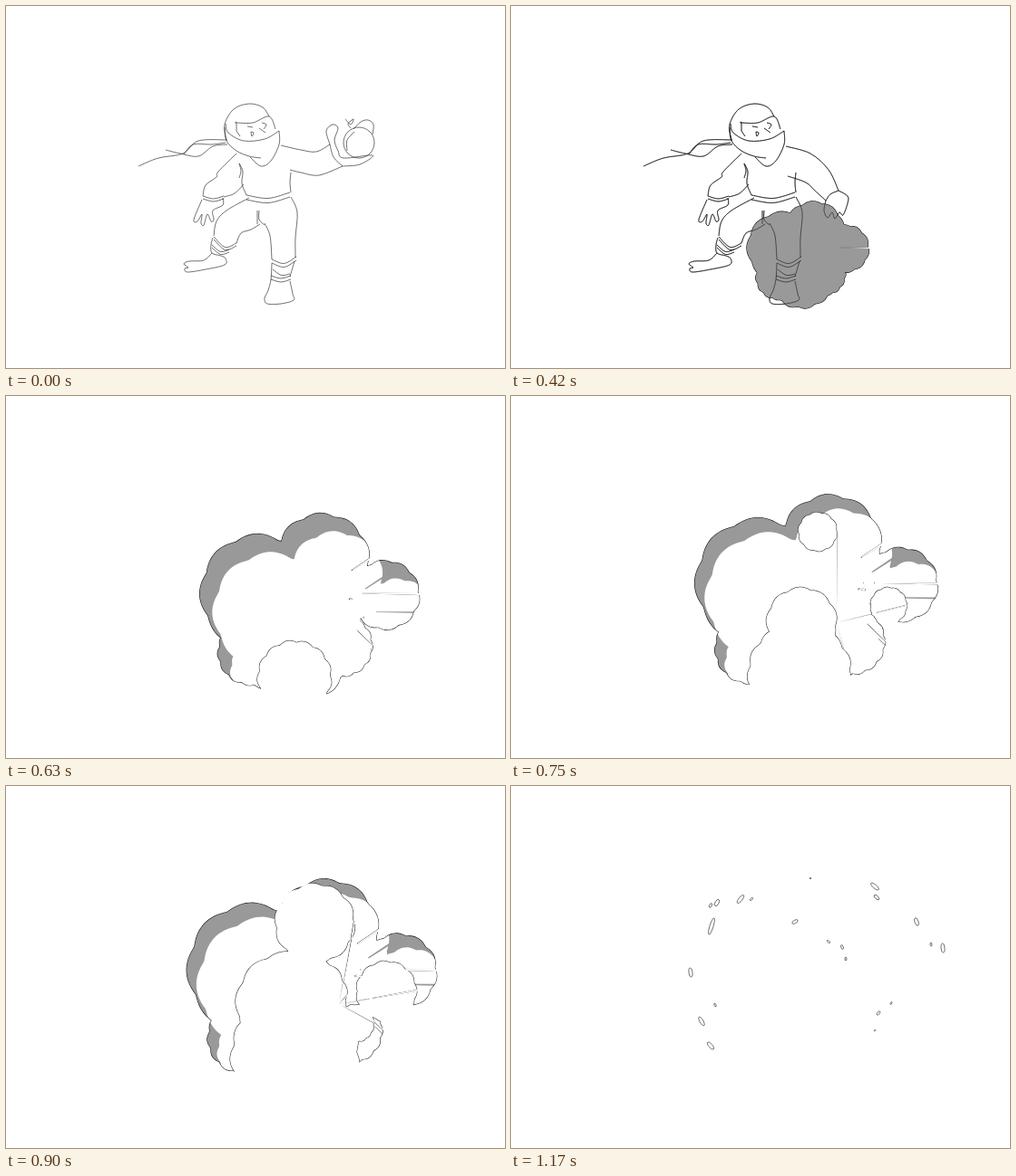
Write an HTML page with a canvas that moves like this. It is 550 px wide and 400 px high and loops after 1230 ms.

```html
<!DOCTYPE html>
<html lang="en">
<head>
<meta charset="utf-8">
<title>Smoke bomb</title>
<style>
html, body { margin: 0; width: 100%; height: 100%; overflow: hidden; background: #fff; }
canvas { display: block; }
</style>
</head>
<body>
<canvas id="stage" width="550" height="400"></canvas>
<script>
const g = document.getElementById('stage').getContext('2d');
const LOOP = 1230, STEP = 30, BLAST = 300, END = 1170;
const INK = '#111', GREY = '#999', WHITE = '#fff';

const clamp = v => Math.max(0, Math.min(1, v));
const mix = (a, b, p) => a + (b - a) * p;
const points = s => s.split(' ').map(q => q.split(',').map(Number));

// A bent line between two ends, e.g. the edge of a cuff.
const bow = (x1, y1, x2, y2, sag) => [[x1, y1], [(x1 + x2) / 2, (y1 + y2) / 2 + sag], [x2, y2]];
const band = (x1, y1, x2, y2, sag, gap) =>
  [bow(x1, y1, x2, y2, sag), bow(x1, y1 + gap, x2, y2 + gap, sag)];

const body = [
  // hood, eyes and mask
  '243,148 241,131 251,114 268,108 283,112 290,122',
  '242,130 245,140 262,149 285,147 301,138',
  '254,138 254,129 254,129 272,129 290,122 297,136',
  '254,138 258,144', '266,133 272,134', '270,139 273,140 271,144 270,139',
  '279,135 286,140', '282,129 287,131 284,136',
  '241,134 243,149 254,160 268,166 281,168',
  '301,138 301,153 292,171 281,177 269,167',
  // left arm and hand
  '254,163 234,183 232,189 220,198 217,210', '262,197 252,207 240,211',
  '216,214 207,236 211,238 216,230 215,240 218,242 222,230 226,238 229,236 228,226 239,220 239,212',
  // torso
  '257,190 259,182 257,174 261,183 260,196 265,209', '314,184 313,195 314,206',
  // left leg
  '268,212 243,226 232,238 229,254', '280,241 270,247 259,251 254,262',
  '277,226 277,241', '279,226 279,236 285,242',
  '228,256 226,264 227,273 237,276 242,279 241,286 220,291 200,294 197,290 201,289 196,285 202,282 218,281 227,273',
  // right leg
  '285,240 291,254 293,280', '314,211 321,228 319,256 319,278',
  '293,284 292,302 289,314 285,323 288,329 303,329 317,325 316,318 313,304', '318,282 313,299'
].map(points).concat(
  band(265, 209, 313, 206, 5, 5), band(217, 210, 240, 210, 3, 3), band(229, 255, 254, 262, 8, 3),
  band(227, 264, 246, 269, 5, 3), band(293, 280, 320, 277, 6, 4), band(292, 298, 314, 298, 3, 4),
  [bow(294, 291, 313, 296, 4)]
);

// Pairs of poses.
const pairs = list => list.map(pair => pair.map(points));
const tails = pairs([
  ['244,148 212,149 195,163 168,168 146,177', '246,151 222,147 192,167 170,170 148,180'],
  ['244,153 228,155 212,166 192,163 176,159', '246,155 228,156 206,167 184,169 172,167'],
  ['242,151 226,153 206,153 196,164', '244,148 224,149 206,157 192,168']
]);
const arm = pairs([
  ['303,154 325,159 342,161 357,153', '303,155 330,163 350,181 361,204'],
  ['313,181 325,184 345,187 371,177', '305,188 325,195 335,204 347,215'],
  ['357,153 361,167 371,177', '361,204 352,208 347,215'],
  ['357,153 353,138 360,131 366,135 362,148 366,160 372,168 404,165 390,175 371,177',
   '361,204 371,210 371,218 366,231 362,228 357,235 354,228 349,234 345,226 347,215']
]);
const bombTrim = ['-15,-26 -9,-20 -6,-26 -12,-21 -9,-16', '-6,-15 2,-23 10,-25 16,-20 15,-9',
  '-13,9 -13,-3 -5,-12'].map(points);

// Each puff swells from the blast, then a hole opens at (hx, hy) and eats it up.
const puffs = [
  // x, y, r, hole birth, hx, hy, hole r
  [272, 202, 72, 660, 322, 252, 77],
  [353, 161, 58, 720, 338, 150, 63],
  [433, 205, 42, 690, 416, 232, 46],
  [345, 215, 60, 750, 330, 235, 66],
  [320, 270, 70, 540, 318, 312, 88],
  [262, 278, 40, 900, 270, 280, 44],
  [378, 270, 37, 840, 385, 262, 41]
];

// Last scraps: x, y, length
const scraps = [
  [198, 206, 10], [221, 155, 19], [220, 132, 5], [227, 129, 8], [253, 125, 11], [265, 125, 4],
  [225, 242, 4], [210, 260, 11], [220, 287, 10], [330, 102, 2], [313, 150, 7], [350, 172, 4],
  [365, 178, 5], [369, 191, 4], [401, 111, 11], [403, 123, 7], [447, 150, 9], [463, 175, 4],
  [476, 179, 10], [405, 251, 5], [401, 270, 2], [419, 240, 3]
];

function line(pts) {
  g.beginPath();
  g.moveTo(...pts[0]);
  for (let i = 0; i < pts.length - 1; i++) {
    const a = pts[i - 1] || pts[i], b = pts[i], c = pts[i + 1], d = pts[i + 2] || c;
    g.bezierCurveTo(b[0] + (c[0] - a[0]) / 6, b[1] + (c[1] - a[1]) / 6,
      c[0] - (d[0] - b[0]) / 6, c[1] - (d[1] - b[1]) / 6, c[0], c[1]);
  }
  g.stroke();
}

const morph = ([a, b], p) => line(a.map((q, i) => [mix(q[0], b[i][0], p), mix(q[1], b[i][1], p)]));

function drawNinja(t) {
  const sway = Math.sin(Math.PI * clamp((t - 90) / 330));
  const swing = clamp((t - 90) / 120);
  body.forEach(line);
  tails.forEach(s => morph(s, sway));
  arm.forEach(s => morph(s, swing));
}

function drawBomb(t) {
  const p = Math.max(0, (t - 90) / 150);
  g.save();
  g.translate(mix(389, 340, p), 151 + 120 * p ** 1.5);
  g.rotate(0.73 * p);
  g.beginPath();
  g.arc(0, 0, 17, 0, 7);
  g.stroke();
  bombTrim.forEach(line);
  g.restore();
}

// One path holding scalloped discs, grown by pad and moved by (dx, dy).
function lumps(discs, pad = 0, dx = 0, dy = 0) {
  const path = new Path2D();
  for (const { x, y, r, n } of discs) {
    for (let i = 0; i < 120; i++) {
      const a = i * Math.PI / 60;
      const k = r * (0.96 + 0.06 * Math.abs(Math.sin(a * n / 2 + n))) + pad;
      path.lineTo(x + dx + k * Math.cos(a), y + dy + k * Math.sin(a));
    }
    path.closePath();
  }
  return path;
}

function fill(path, colour) {
  g.fillStyle = colour;
  g.fill(path);
}

function drawSmoke(t, ninja) {
  const grow = 1 - (1 - clamp((t - BLAST) / 600)) ** 2.5;
  const fade = clamp((END - t) / 270);
  const discs = puffs.map(([x, y, r], i) => ({
    x: mix(320, x, grow), y: mix(315, y, grow),
    r: mix(15, r, grow) * (1.05 - 0.05 * fade), n: 8 + i
  }));
  const holes = puffs.map(([x, y, , birth, hx, hy, r], i) => {
    const q = clamp((t - birth) / (END - birth));
    return { x: mix(hx, x, q * q), y: mix(hy, y, q * q), r: r * q ** 0.4, n: 9 + i };
  }).filter(h => h.r > 0);
  const shade = (16 + 240 * (1 - grow) ** 2) * fade;

  const edge = lumps(discs), inside = lumps(discs, -0.6);
  fill(edge, INK);
  fill(inside, GREY);
  if (ninja) drawNinja(t);
  g.save();
  g.clip(inside);
  fill(lumps(discs, 0, shade * 0.7, shade), WHITE);
  g.restore();
  g.save();
  g.clip(edge);
  fill(lumps(holes, 0.5), INK);
  g.restore();
  fill(lumps(holes), WHITE);
}

function drawScrap([x, y, len]) {
  g.beginPath();
  g.ellipse(x, y, len / 2, Math.min(2, len / 4), Math.atan2(x - 335, 190 - y), 0, 7);
  g.stroke();
}

function frame() {
  const t = Math.floor(performance.now() % LOOP / STEP) * STEP;
  const ninja = t < 570;
  g.fillStyle = WHITE;
  g.fillRect(0, 0, 550, 400);
  g.strokeStyle = INK;
  g.lineWidth = 0.6;
  if (ninja) drawNinja(t);
  if (t < BLAST) drawBomb(t);
  else if (t < END) drawSmoke(t, ninja);
  else scraps.forEach(drawScrap);
  requestAnimationFrame(frame);
}
frame();
</script>
</body>
</html>
```
